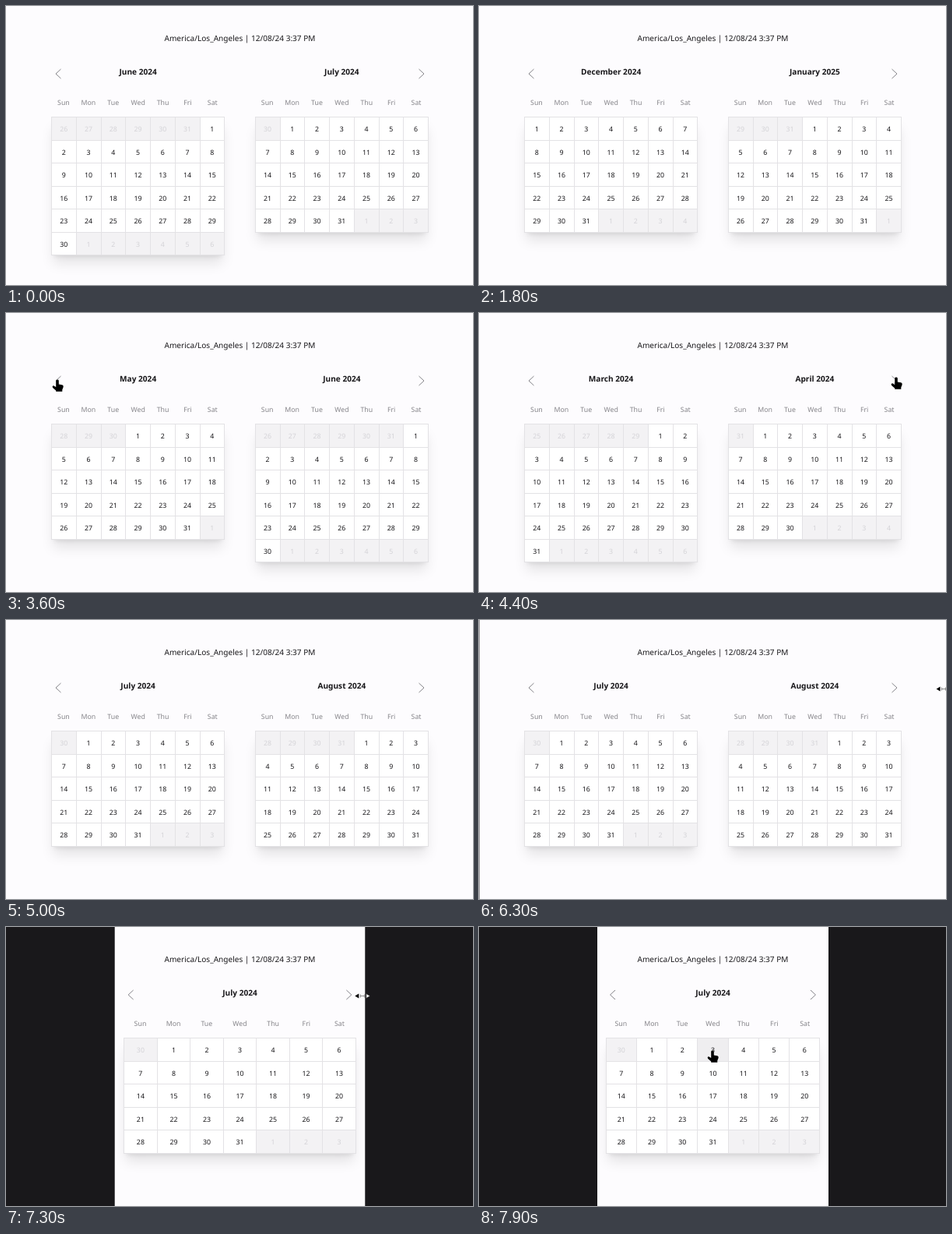
Recreate the animation shown at these times as an HTML page. Size 600x358 px, loop 8 s.

```html
<!DOCTYPE html>
<html lang="en">
<head>
<meta charset="utf-8">
<title>Calendar</title>
<style>
  html, body { margin: 0; width: 100%; height: 100%; overflow: hidden; background: #19181b; }
  #stage { position: relative; width: 600px; height: 358px; overflow: hidden; color: #18171a;
    font-family: "Noto Sans", sans-serif; text-rendering: geometricPrecision; }
  .line { position: absolute; text-align: center; white-space: nowrap; line-height: 20px; }
  #now { left: 0; width: 601px; top: 31px; font-size: 10.07px; }
  .cal { position: absolute; top: 0; }
  .title { left: 0; right: 0; top: 74px; font-size: 10.1px; font-weight: 700; }
  .week, .grid { position: absolute; left: 0; right: 0; display: grid;
    grid-template-columns: repeat(7, 1fr); text-align: center; font-size: 8.8px; }
  .week { top: 113.5px; line-height: 20px; color: #858489; }
  .grid { top: 142px; border: solid #e3e2e5; border-width: 1px 0 0 1px; background: #fff;
    box-shadow: 0 12.6px 16px -3px rgba(0, 0, 0, .1), 0 5px 6px -4px rgba(0, 0, 0, .1); }
  .grid div { box-sizing: border-box; height: 29.5px; line-height: 31px;
    border: solid #e3e2e5; border-width: 0 1px 1px 0; }
  .grid .off { background: #f3f2f4; color: #d4d3d7; }
  .grid .hover { background: #efeef0; }
  svg { position: absolute; left: 0; top: 0; }
  .chevron { fill: none; stroke: #85848a; }
  .pointer { fill: #000; stroke: #fff; paint-order: stroke; stroke-linejoin: round; }
</style>
</head>
<body>
<div id="stage">
  <svg width="600" height="358">
    <rect id="view" height="358" fill="#fdfcfe"/>
    <path id="prev" class="chevron" d="M3 -6L-3.5 0L3 6"/>
    <path id="next" class="chevron" d="M-3 -6L3.5 0L-3 6"/>
  </svg>
  <div id="now" class="line">America/Los_Angeles | 12/08/24 3:37 PM</div>
</div>
<script>
const LOOP = 8000, STEP = 100, ROW = 29.5, TOP = 143, MIDDLE = 300.5;
const stage = document.getElementById("stage");

// Pointer trips: glide from one point to the other, then rest until gone
const trips = [
  { start: 400, end: 1200, gone: 1200, from: [301, 283], to: [-10, -12] },
  { start: 1900, end: 2600, gone: 3900, from: [9, 48], to: [66, 86] },
  { start: 4100, end: 4400, gone: 5000, from: [576, 92], to: [536, 83] },
  { start: 7600, end: 7900, gone: 8000, from: [447, 88], to: [300, 159] }
];

const clamp = (v, lo, hi) => Math.min(hi, Math.max(lo, v));
const progress = (t, start, end) => clamp((t - start) / (end - start), 0, 1);
const smooth = u => u * u * (3 - 2 * u);
const clicks = (t, start, gap, most) => clamp(Math.floor((t - start) / gap) + 1, 0, most);
const day = (month, date) => new Date(Date.UTC(2024, month, date));
const label = (date, format) => date.toLocaleDateString("en-US", { timeZone: "UTC", ...format });

function add(parent, className, text = "") {
  const el = document.createElement("div");
  el.className = className;
  el.textContent = text;
  parent.append(el);
  return el;
}

function makeCalendar() {
  const box = add(stage, "cal");
  const title = add(box, "line title");
  const week = add(box, "week");
  // September 2024 begins on a Sunday
  for (let d = 1; d <= 7; d++) add(week, "", label(day(8, d), { weekday: "short" }));
  const grid = add(box, "grid");
  const cells = Array.from({ length: 42 }, () => add(grid, ""));
  return { box, title, cells };
}
const cals = [makeCalendar(), makeCalendar()];

stage.insertAdjacentHTML("beforeend", `<svg width="600" height="358">
  <g id="hand"><path class="pointer" transform="scale(.9)"
    d="M-2 1C-2-1 2-1 2 1V6L7 7Q9 7.5 8.5 10L7 14V16.5H-2V15L-6.5 11C-8 9-6 7.5-4.5 8.5L-2 10Z"/></g>
  <path id="arrow" class="pointer" d="M0 0V14L3.4 11L5.8 16L8 15L5.8 10.2H10Z"/>
  <g id="resize">
    <path d="M-10 0L-5-3V3Z"/>
    <path d="M-3-2V2M2-2V2M-3 0H2" fill="none" stroke="#8a8a8a"/>
    <path d="M4.5-3L9.5 0L4.5 3Z" fill="#fff" stroke="#222" stroke-width=".8"/>
  </g></svg>`);
const [view, prev, next, hand, arrow, resize] =
  ["view", "prev", "next", "hand", "arrow", "resize"].map(id => document.getElementById(id));

function place(el, x, y) {
  el.setAttribute("transform", `translate(${x} ${y})`);
}

function findTip(t) {
  const trip = trips.find(p => t >= p.start && t < p.gone);
  if (!trip) return null;
  const u = progress(t, trip.start, trip.end);
  const [x, y] = trip.from.map((v, i) => v + (trip.to[i] - v) * u);
  return { x, y };
}

// Fills one calendar; true if the pointer is over a day of its month
function fill(cal, month, left, width, tip) {
  const lead = day(month, 1).getUTCDay();
  const end = lead + day(month + 1, 0).getUTCDate();
  const total = Math.ceil(end / 7) * 7;
  cal.box.style.left = left + "px";
  cal.box.style.width = width + "px";
  cal.title.textContent = label(day(month, 1), { month: "long", year: "numeric" });

  const col = tip ? Math.floor((tip.x - left) / width * 7) : -1;
  const row = tip ? Math.floor((tip.y - TOP) / ROW) : -1;
  const over = col >= 0 && col < 7 ? row * 7 + col : -1;

  cal.cells.forEach((cell, i) => {
    const off = i < lead || i >= end;
    cell.style.display = i < total ? "" : "none";
    cell.className = off ? "off" : i === over ? "hover" : "";
    cell.textContent = day(month, 1 + i - lead).getUTCDate();
  });
  return over >= lead && over < end;
}

function draw(t) {
  const month = t < 1800 ? 5 : 11 - clicks(t, 2700, 130, 9) + clicks(t, 4600, 100, 4);
  const inset = 152 * smooth(progress(t, 6260, 7520));
  const viewWidth = 2 * (MIDDLE - inset);
  view.setAttribute("x", inset);
  view.setAttribute("width", viewWidth);

  // One month fits below the breakpoint, two above it
  const two = viewWidth > 484;
  const span = Math.min(485, viewWidth * 0.929);
  const left = MIDDLE - span / 2, right = left + span;
  const width = two ? (span - 38.5) / 2 : span;
  const resizing = t >= 5900 && t < 7700;
  const tip = resizing ? null : findTip(t);
  let active = fill(cals[0], month, left, width, tip);
  cals[1].box.style.display = two ? "" : "none";
  if (two) active = fill(cals[1], month + 1, right - width, width, tip) || active;

  for (const [chevron, x] of [[prev, left + 9.5], [next, right - 9.5]]) {
    place(chevron, x, 87);
    if (tip && Math.hypot(tip.x - x, tip.y - 87) < 12) active = true;
  }

  const pointer = resizing ? resize : tip && (active ? hand : arrow);
  for (const p of [hand, arrow, resize]) p.style.display = p === pointer ? "" : "none";
  if (resizing) place(resize, 598 - inset + 10 * (1 - progress(t, 5900, 6300)), 88.5);
  else if (tip) place(pointer, tip.x, tip.y);
}

let last = -1;
function tick() {
  const t = Math.floor(performance.now() % LOOP / STEP) * STEP;
  if (t !== last) draw(last = t);
  requestAnimationFrame(tick);
}
tick();
</script>
</body>
</html>
```
